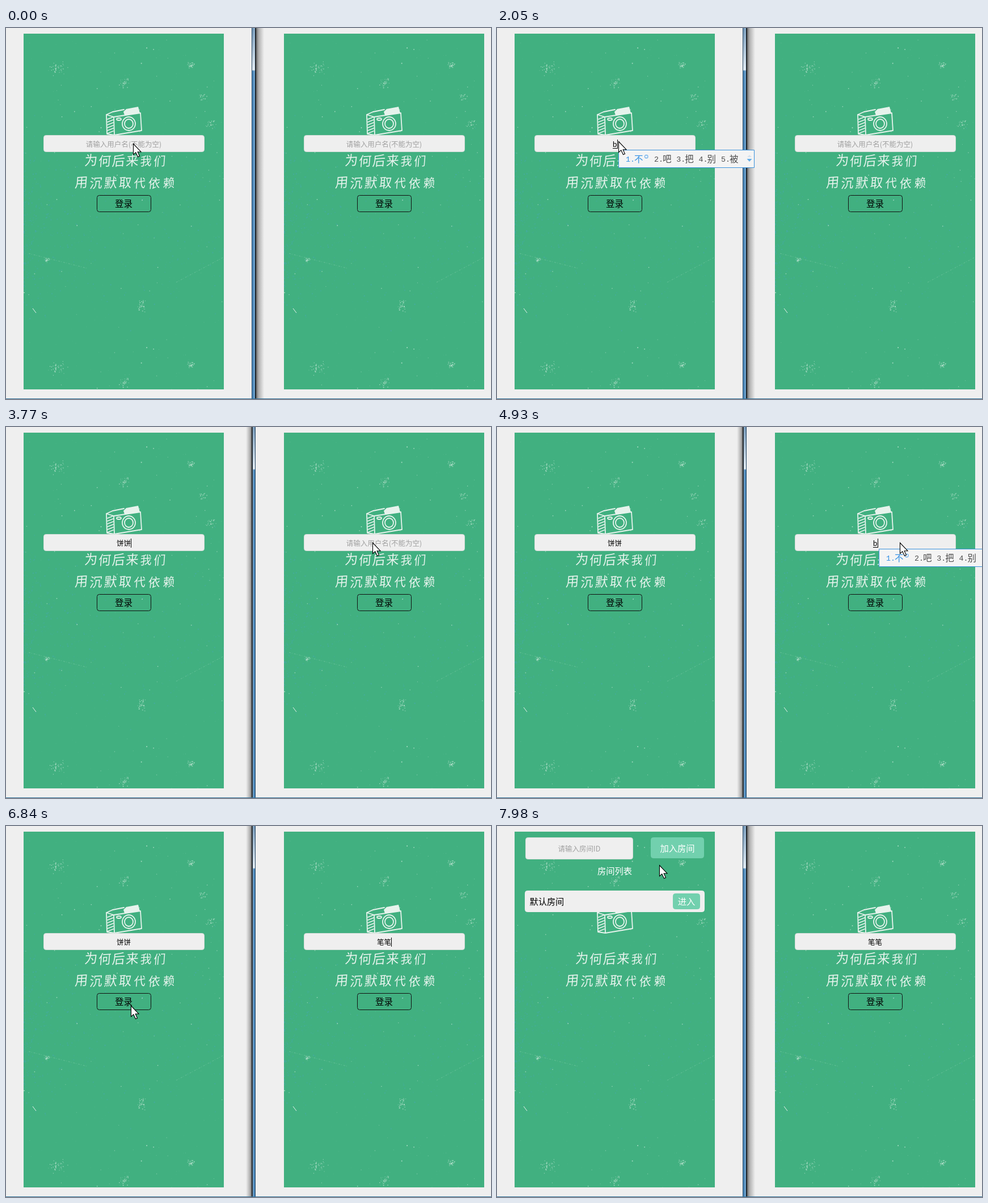
Recreate the animation shown at these times as an HTML page with a canvas. Size 855x655 px, loop 8 s.

```html
<!DOCTYPE html>
<html lang="zh">
<head>
<meta charset="utf-8">
<style>
  html, body { margin: 0; width: 100%; height: 100%; overflow: hidden; background: #efefef; }
  canvas { display: block; }
</style>
</head>
<body>
<canvas id="stage" width="855" height="655"></canvas>
<script>
const W = 855, H = 655, LOOP = 8000;
const PANEL = { x: 31, y: 10, w: 353, h: 628 }, SHIFT = 459, MID = 207.5;
const GREEN = '#41b080', PALE = '#efefef', MINT = '#72d0ae', CHALK = '#e6f3ec';
const GREY = '#a0a0a0', EDGE = '#d2dcd7', BLUE = '#3390e4';
const SANS = '"Noto Sans CJK SC", "Noto Sans CJK", sans-serif';
const BLINK = 580, KEY_GAP = 190, COMMIT = 765;
const ctx = document.getElementById('stage').getContext('2d');

const left = { name: '饼饼', focus: 890, blur: 3960, typing: 2045 };
const right = { name: '笔笔', focus: 3960, blur: 7030, typing: 4925 };
const candidates = { b: '不吧把别被'.split(''), bb: ['饼饼', '不明白', '帮别人', '办不到', '不必了'] };

// Pointer moves: start, end, destination.
const moves = [
  [890, 1070, 214, 200],
  [3010, 3750, 646, 204],
  [3940, 4140, 710, 204],
  [5700, 6060, 660, 172],
  [6060, 6800, 220, 317],
  [7230, 7780, 331, 146],
  [7780, 7960, 286, 69]
];

function pointerAt(t) {
  const sampled = 125 + Math.floor((t - 125) / 191.4) * 191.4;
  let x = 224, y = 204;
  for (const [from, to, toX, toY] of moves) {
    const p = Math.min(1, Math.max(0, (sampled - from) / (to - from)));
    const ease = p * p * (3 - 2 * p);
    x += (toX - x) * ease;
    y += (toY - y) * ease;
  }
  return [Math.round(x), Math.round(y)];
}

function typedText({ typing, name }, t) {
  const dt = t - typing;
  if (dt < 0) return '';
  if (dt < KEY_GAP) return 'b';
  return dt < COMMIT ? 'bb' : name;
}

function caretShown({ focus, blur, typing }, t) {
  if (t < focus || t >= blur) return false;
  return t >= typing || Math.floor((t - focus) / BLINK) % 2 === 0;
}

function seeded(seed) {
  return () => (seed = (seed * 16807) % 2147483647) / 2147483647;
}

function text(g, str, x, y, size, color, align = 'center') {
  g.font = `${size}px ${SANS}`;
  g.textAlign = align;
  g.fillStyle = color;
  g.fillText(str, x, y + size * 0.38);
}

function box(x, y, w, h, r, fill, stroke = fill) {
  ctx.beginPath();
  ctx.roundRect(x + 0.5, y + 0.5, w - 1, h - 1, r);
  if (fill) { ctx.fillStyle = fill; ctx.fill(); }
  ctx.lineWidth = 1;
  ctx.strokeStyle = stroke;
  ctx.stroke();
}

function path(g, points, close) {
  g.beginPath();
  for (let i = 0; i < points.length; i += 2) g.lineTo(points[i], points[i + 1]);
  if (close) g.closePath();
}

// Chalk dust; the pattern repeats down the panel.
function drawTexture(g) {
  const rnd = seeded(4217), period = 529;
  const bell = () => rnd() + rnd() + rnd() - 1.5;
  const white = '225,243,232', blue = '72,170,178';
  function speck(x, y, size, rgb, alpha) {
    g.fillStyle = `rgba(${rgb},${alpha})`;
    g.fillRect(x, y, size, size);
    g.fillRect(x, y + period, size, size);
  }
  function cluster(x, y, n, spread) {
    for (let i = 0; i < n; i++) {
      speck(x + bell() * spread, y + bell() * spread, 0.8 + rnd(), white, 0.2 + rnd() * 0.4);
    }
  }
  for (let i = 0; i < 750; i++) {
    speck(PANEL.x + PANEL.w * rnd() ** 2.4, 350 + bell() * 150, 0.8 + rnd() * 1.4, blue, 0.2 + rnd() * 0.4);
  }
  for (let i = 0; i < 320; i++) {
    const glow = rnd() ** 5;
    speck(PANEL.x + rnd() * PANEL.w, PANEL.y + rnd() * period, 0.7 + glow, white, 0.12 + glow * 0.6);
  }
  cluster(91, 70, 44, 13);
  cluster(325, 66, 34, 6);
  cluster(207, 97, 34, 9);
  cluster(346, 122, 24, 6);
  cluster(361, 169, 26, 8);
  cluster(72, 408, 30, 5);
  cluster(240, 490, 40, 10);
  g.strokeStyle = `rgba(${white},.22)`;
  g.setLineDash([3, 2, 1, 3]);
  path(g, [40, 398, 142, 424]);
  g.stroke();
  path(g, [300, 449, 383, 405]);
  g.stroke();
  g.setLineDash([]);
  g.strokeStyle = CHALK;
  path(g, [47, 495, 53, 503]);
  g.stroke();
}

function drawCamera(g) {
  g.strokeStyle = g.fillStyle = CHALK;
  g.lineWidth = 1.8;
  g.lineJoin = g.lineCap = 'round';
  path(g, [190, 157, 237, 150, 239, 181, 191, 189], true);
  g.stroke();
  path(g, [191, 189, 178, 187, 177, 153, 190, 157]);
  g.stroke();
  path(g, [177, 153, 188, 148, 208, 144]);
  g.stroke();
  path(g, [207, 148, 212, 143, 233, 139, 236, 150, 209, 154], true);
  g.fill();
  for (let y = 161; y < 190; y += 5) {
    path(g, [179, y, 189, y - 4]);
    g.stroke();
  }
  for (const [x, y, rx, ry] of [[216.5, 169, 11.5, 12], [216.5, 169, 7.5, 8], [199, 161, 4, 2]]) {
    g.beginPath();
    g.ellipse(x, y, rx, ry, 0, 0, 7);
    g.stroke();
  }
}

function drawScript(g, str, x, y, gap) {
  const rnd = seeded(91);
  [...str].forEach((char, i) => {
    g.save();
    g.translate(x + i * gap, y + rnd() * 2 - 1);
    g.transform(0.96, -0.06, -0.08, 1, 0, 0);
    text(g, char, 0, 0, 21 + rnd() * 3, CHALK);
    g.restore();
  });
}

function makePanel() {
  const canvas = document.createElement('canvas');
  canvas.width = PANEL.x + PANEL.w;
  canvas.height = PANEL.y + PANEL.h;
  const g = canvas.getContext('2d');
  g.beginPath();
  g.rect(PANEL.x, PANEL.y, PANEL.w, PANEL.h);
  g.clip();
  g.fillStyle = GREEN;
  g.fillRect(0, 0, W, H);
  drawTexture(g);
  drawCamera(g);
  drawScript(g, '为何后来我们', 150, 234, 24.2);
  drawScript(g, '用沉默取代依赖', 133, 273, 25.7);
  return canvas;
}

function drawLogin(user, t) {
  const value = typedText(user, t);
  const words = candidates[value];
  box(66, 189, 284, 30, 4, PALE, EDGE);
  text(ctx, value || '请输入用户名(不能为空)', MID, 205.5, 12.5, value ? '#000' : GREY);
  const half = ctx.measureText(value).width / 2;
  ctx.fillStyle = '#000';
  if (words) ctx.fillRect(Math.round(MID - half), 212, Math.round(half * 2), 1);
  if (caretShown(user, t)) ctx.fillRect(Math.round(MID + 0.3 + half), 197, 1, 16);
  box(160, 295, 96, 30, 4, null, '#111');
  text(ctx, '登录', MID, 310, 15.5, '#000');
  if (words) drawCandidates(Math.round(MID + 2.5 + half), words);
}

function drawCandidates(x0, words) {
  const width = 240 + (words.join('').length - words.length) * 16;
  box(x0, 215, width, 32, 0, '#f4f4f4', '#3b93dd');
  let x = x0 + 13;
  words.forEach((word, i) => {
    const color = i ? '#4c4c4c' : BLUE;
    text(ctx, word, x + 15, 231, 15.5, color, 'left');
    ctx.font = '13.33px "Liberation Mono", monospace';
    ctx.fillText(i + 1 + '.', x, 236);
    x += 23.3 + word.length * 16;
    if (!i) {
      box(x - 6, 224, 6, 6, 1, '#fff', BLUE);
      x += 10.7;
    }
  });
  const mid = x0 + width - 9;
  ctx.fillStyle = '#d5e2ee';
  path(ctx, [mid - 4, 228, mid, 224, mid + 4, 228], true);
  ctx.fill();
  ctx.fillStyle = '#64aee8';
  path(ctx, [mid - 4.5, 231, mid + 4.5, 231, mid, 236], true);
  ctx.fill();
}

function drawRooms() {
  box(50, 20, 190, 39, 4, PALE, EDGE);
  text(ctx, '请输入房间ID', 145, 40.5, 12.5, GREY);
  box(271, 20, 94, 37, 4, MINT);
  text(ctx, '加入房间', 318, 39, 15.3, '#fff');
  text(ctx, '房间列表', MID, 79, 15.3, '#fff');
  box(49, 114, 317, 38, 4, PALE);
  text(ctx, '默认房间', 57.5, 133, 15.2, '#000', 'left');
  box(310, 119, 48, 28, 4, MINT);
  text(ctx, '进入', 334, 133, 15.3, '#fff');
}

// The border of the active window casts a shadow on the other one.
function drawDivider(rightActive) {
  const x = rightActive ? 434 : 433;
  const [from, to] = rightActive ? [434, 423] : [440, 455];
  const shadow = ctx.createLinearGradient(from, 0, to, 0);
  shadow.addColorStop(0, '#5c5c5c');
  shadow.addColorStop(0.35, '#b0b0b0');
  shadow.addColorStop(1, PALE);
  ctx.fillStyle = shadow;
  ctx.fillRect(Math.min(from, to), 0, Math.abs(to - from), H);

  const glass = ctx.createLinearGradient(0, 0, 0, 76);
  glass.addColorStop(0, '#6f93b4');
  glass.addColorStop(0.97, '#e6edf3');
  glass.addColorStop(1, '#4a86b8');
  ctx.fillStyle = glass;
  ctx.fillRect(x, 0, 6, H);
  ctx.fillStyle = 'rgba(190,222,245,.6)';
  ctx.fillRect(rightActive ? x + 1 : x + 4, 0, 1, H);
  ctx.fillStyle = '#2b4a66';
  ctx.fillRect(rightActive ? x + 5 : x, 0, 1, H);
  ctx.fillStyle = '#24292e';
  ctx.fillRect(rightActive ? x - 1 : x + 6, 0, 2, H);
  ctx.fillStyle = '#347299';
  ctx.fillRect(0, 654, W, 1);
}

function drawPointer(x, y) {
  ctx.save();
  ctx.translate(x + 0.5, y + 0.5);
  path(ctx, [0, 0, 0, 19, 4.3, 15.2, 8, 23, 11, 21.7, 7.6, 14.2, 13.5, 14.2], true);
  ctx.fillStyle = '#fff';
  ctx.fill();
  ctx.lineWidth = 1.1;
  ctx.strokeStyle = '#000';
  ctx.stroke();
  ctx.restore();
}

const panel = makePanel();

function draw(t) {
  ctx.fillStyle = PALE;
  ctx.fillRect(0, 0, W, H);
  drawDivider(t >= 3580 && t < right.blur);
  ctx.drawImage(panel, 0, 0);
  ctx.drawImage(panel, SHIFT, 0);

  ctx.save();
  ctx.translate(SHIFT, 0);
  drawLogin(right, t);
  ctx.restore();

  if (t >= 7220) drawRooms();
  else drawLogin(left, t);
  if (t < 500 || t >= left.focus) drawPointer(...pointerAt(t));
}

const start = performance.now();
function tick() {
  draw((performance.now() - start) % LOOP);
  requestAnimationFrame(tick);
}
tick();
</script>
</body>
</html>
```
